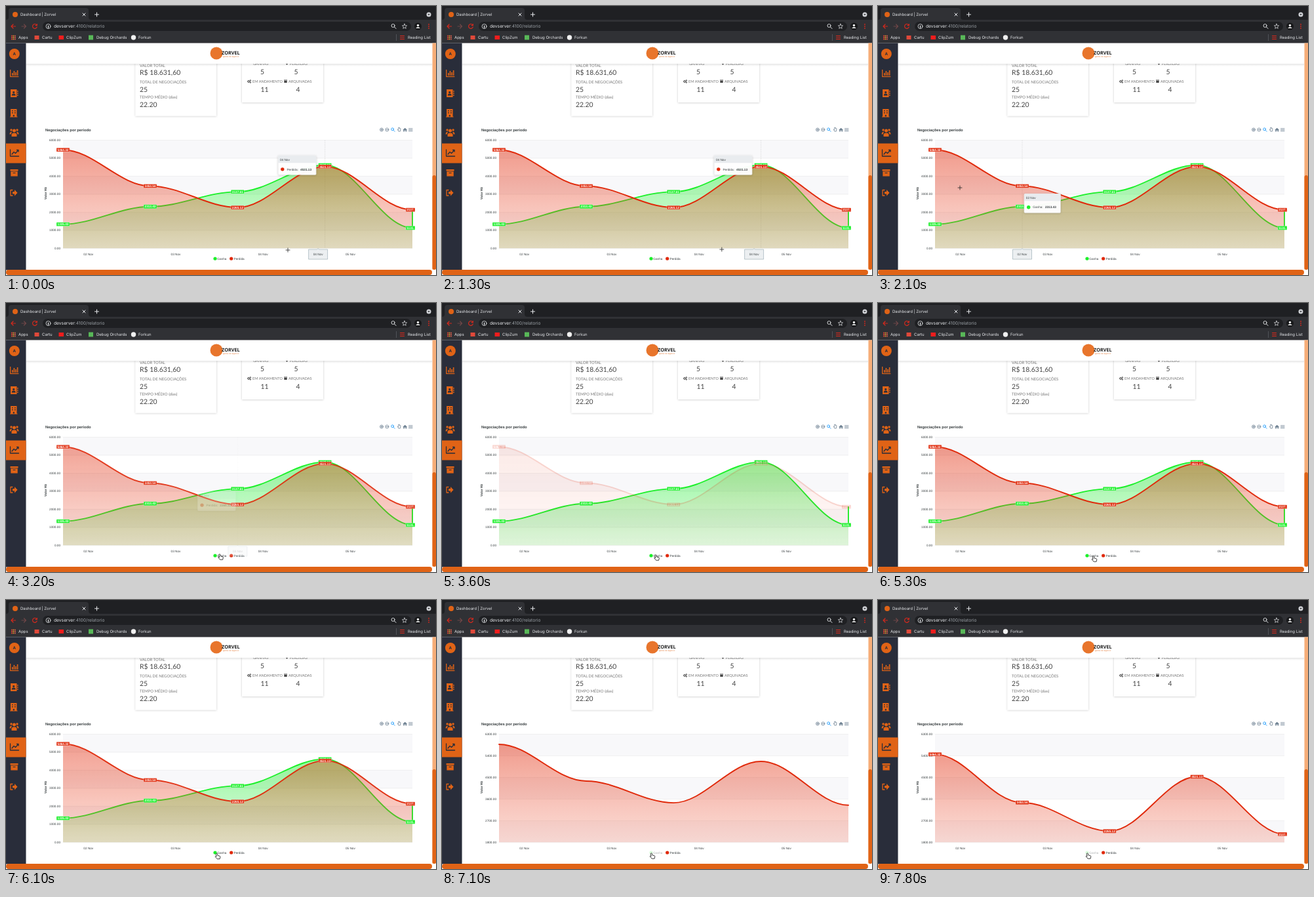
Recreate the animation shown at these times as an HTML page. Size 656 px wide and 410 px high, loop 8 s.

```html
<!DOCTYPE html>
<html lang="pt">
<head>
<meta charset="utf-8">
<title>Dashboard | Zorvel</title>
<style>
html, body { margin: 0; width: 100%; height: 100%; overflow: hidden; background: #fff; }
svg { display: block; width: 100vw; height: 100vh; }
text { text-rendering: geometricPrecision; }
.ui { font: 6px Inter, sans-serif; fill: #e8eaed; }
.card { font: 6px Lato, sans-serif; fill: #777; }
.big { font-size: 10.400px; fill: #444; }
.mid { text-anchor: middle; }
.chart { font: 4.7px "Liberation Sans", Arial, sans-serif; fill: #373d3f; }
.bold { font-weight: bold; }
.stroke { fill: none; stroke-linecap: round; stroke-linejoin: round; }
</style>
</head>
<body>
<svg viewBox="0 0 656 410">
  <defs>
    <linearGradient id="redFill" x2="0" y2="1"><stop stop-color="#e0290a" stop-opacity=".47"/><stop offset="1" stop-color="#ec4a2a" stop-opacity=".19"/></linearGradient>
    <linearGradient id="greenFill" x2="0" y2="1"><stop stop-color="#1cf02a" stop-opacity=".47"/><stop offset="1" stop-color="#50e860" stop-opacity=".19"/></linearGradient>
    <linearGradient id="fade" x2="0" y2="1"><stop stop-opacity=".1"/><stop offset="1" stop-opacity="0"/></linearGradient>
    <filter id="soft" x="-10%" y="-10%" width="120%" height="120%"><feDropShadow dx="0" dy=".5" stdDeviation="1.800" flood-opacity=".22"/></filter>
  </defs>
  <rect width="656" height="410" fill="#fff"/>

  <!-- summary cards -->
  <g fill="#fff" filter="url(#soft)"><path d="M197.500 70h123.500v97.500h-123.500z"/><path d="M360 70h124v77h-124z"/></g>
  <g class="card">
    <text x="204" y="93">VALOR TOTAL</text><text class="big" x="204" y="105">R$ 18.631,60</text>
    <text x="204" y="117.500">TOTAL DE NEGOCIAÇÕES</text><text class="big" x="204" y="131">25</text>
    <text x="204" y="140.500">TEMPO MÉDIO (dias)</text><text class="big" x="204" y="154">22.20</text>
    <g style="font-size:5.600px">
      <text x="377" y="90">GANHAS</text><text x="433" y="90">PERDIDAS</text>
      <text x="376" y="117">EM ANDAMENTO</text><text x="424" y="117" dx="7">ARQUIVADAS</text>
    </g>
    <g class="big mid"><text x="391" y="104">5</text><text x="442.500" y="104">5</text><text x="394.500" y="131">11</text><text x="445.500" y="131">4</text></g>
    <g fill="#444"><path d="M424 112.500h5v1h-5zM424.300 114h4.400v3h-4.400zM427 88h3l-1.500 2z"/></g>
    <g fill="none" stroke="#444"><circle cx="370" cy="115" r="1.400"/><circle cx="372.800" cy="113.500" r=".8"/><circle cx="372.800" cy="116.500" r=".8"/></g>
  </g>

  <!-- page header -->
  <rect x="31" y="88" width="619" height="4" fill="url(#fade)"/>
  <rect x="31" y="56" width="619" height="32" fill="#fff"/>
  <circle cx="321" cy="72" r="9.500" fill="#e8752c"/>
  <text x="329" y="74" style="font:bold 7.300px 'Noto Sans',sans-serif" fill="#222">ZORVEL</text>
  <text x="331" y="77.500" style="font:2.600px Inter,sans-serif" fill="#e8752c">gestão de negócios</text>

  <!-- browser -->
  <rect width="656" height="22" fill="#1f2023"/>
  <path d="M0 56.500V21q4 0 4-4V7q0-4 4-4h114q4 0 4 4v10q0 4 4 4h526v35.500z" fill="#303135"/>
  <rect x="56" y="24" width="562" height="14" rx="7" fill="#1f2023"/>
  <circle cx="14" cy="13" r="4" fill="#e06316"/>
  <g class="stroke" stroke="#e8eaed">
    <path d="M117 11l4 4m0-4l-4 4M135.500 13h6m-3-3v6"/>
    <path d="M64.500 30.200v3" stroke-width="1.200"/><circle cx="64.500" cy="31" r="3.500" stroke-width=".8"/>
    <circle cx="590.500" cy="30" r="2.500" stroke-width=".9"/><path d="M592.500 32l2.500 2.500"/>
    <path d="M608 27.200l1 2.500 2.600.2-2 1.800.6 2.600-2.200-1.400-2.200 1.400.6-2.600-2-1.800 2.600-.2z" stroke-width=".7"/>
  </g>
  <circle cx="645" cy="13" r="3.500" fill="#d0d2d6"/><path d="M643.300 12.300h3.400l-1.700 2z" fill="#1f2023"/>
  <g class="stroke" stroke="#d4281c" stroke-width="1.200">
    <path d="M14.500 31h-6.500m3-3l-3 3 3 3M46.800 29a3.400 3.400 0 1 0 .4 3M47.300 27.500v2.200h-2.300"/>
    <path d="M24 31h6.500m-3-3l3 3-3 3" stroke="#6e4648"/>
    <path d="M601.500 45.500h6m-6 2.500h6m-6 2.500h6"/>
  </g>
  <circle cx="628.500" cy="31" r="5.500" fill="#17181a"/><path d="M625 34q3.500-4 7 0z" fill="#eee"/><circle cx="628.500" cy="29.500" r="1.700" fill="#eee"/>
  <g fill="#d4281c"><circle cx="645" cy="28" r=".9"/><circle cx="645" cy="31" r=".9"/><circle cx="645" cy="34" r=".9"/></g>
  <g class="ui">
    <text x="22" y="15.200">Dashboard | Zorvel</text>
    <text x="73" y="33.300" style="font-size:6.700px">devserver<tspan fill="#9aa0a6">:4100/relatorio</tspan></text>
    <text x="19" y="50.200">Apps</text><text x="55" y="50.200">Cartu</text><text x="92" y="50.200">ClipZum</text>
    <text x="138" y="50.200">Debug Orchards</text><text x="202" y="50.200">Forkun</text><text x="613" y="50.200">Reading List</text>
  </g>
  <g id="apps"></g>
  <rect x="43.500" y="45" width="7" height="6" fill="#e0493a"/><rect x="80.500" y="45" width="7.500" height="6" fill="#f01d1d"/>
  <rect x="126" y="44.500" width="7" height="7" fill="#58b858"/><circle cx="194.500" cy="48" r="3.700" fill="#f2f2f2"/>
  <path d="M595.500 43v10" stroke="#5f6368" stroke-width=".7"/>

  <!-- sidebar and scrollbars -->
  <rect y="56.500" width="30.500" height="346" fill="#292d3a"/>
  <rect y="209.500" width="30.500" height="30" fill="#e06316"/>
  <circle cx="12.800" cy="73" r="8" fill="#e06316"/>
  <text class="ui mid" x="12.800" y="75.300" style="font-weight:700;fill:#292d3a">A</text>
  <g fill="#e06316">
    <path d="M6 97h1.300v10h12v1.300H6zM9 102h1.600v4H9zM11.600 99h1.600v7h-1.600zM14.200 101h1.600v5h-1.600zM16.800 98h1.600v8h-1.600z"/>
    <path d="M7 127h9.500v12H7zM17.200 129h1.300v2h-1.300zM17.200 132h1.300v2h-1.300zM17.200 135h1.300v2h-1.300z"/>
    <path d="M7 157h9.500v11.500H17.500v1H6v-1h1z"/>
    <circle cx="12.500" cy="190" r="2.500"/><circle cx="8" cy="189" r="1.700"/><circle cx="17" cy="189" r="1.700"/>
    <path d="M8.500 199v-3q0-2.500 4-2.500t4 2.500v3zM5.500 195.500q0-4 3.500-3.800l-1.500 3.800zM19.500 195.500q0-4-3.500-3.800l1.500 3.800z"/>
    <path d="M6.500 249h12v2.500h-12zM7.300 252.300h10.400v7.200H7.300z"/>
    <path d="M10 283h3v-3l4.500 4.700-4.500 4.700v-3h-3z"/>
  </g>
  <path d="M10.500 254.500h4" stroke="#292d3a"/>
  <g fill="#292d3a"><circle cx="11.700" cy="131.500" r="1.600"/><path d="M8.800 136.500q0-3 2.900-3t2.900 3zM9 159h1.600v1.600H9zM13 159h1.600v1.600H13zM9 162h1.600v1.600H9zM13 162h1.600v1.600H13zM10.800 166h2v2.500h-2z"/></g>
  <path class="stroke" d="M6.500 219v10h13M9 226l3-3.500 2.500 2 4.500-5m-2.500 0h2.500v2.500" stroke="#292d3a" stroke-width="1.300"/>
  <path class="stroke" d="M10 280.500H7v8.500h3" stroke="#e06316" stroke-width="1.300"/>
  <path d="M650.500 56.500h5.500v345h-5.500z" fill="#f6ad78"/>
  <rect x="650.500" y="258" width="5.500" height="144" rx="2.700" fill="#e06316"/>
  <rect y="402" width="650" height="8" rx="4" fill="#e06316"/>

  <!-- chart -->
  <g class="chart">
    <text class="bold" x="60" y="190.500" style="font-size:5.800px">Negociações por período</text>
    <text class="bold mid" transform="translate(62.300 285.500)rotate(-90)">Valor R$</text>
    <g class="stroke" stroke="#6e8192" stroke-width=".8">
      <circle cx="573" cy="188.500" r="2.500"/><circle cx="581.300" cy="188.500" r="2.500"/>
      <path d="M571.700 188.500h2.600m-1.300-1.300v2.600M580 188.500h2.600M614.500 186.800h5.500m-5.500 1.900h5.500m-5.500 1.900h5.500"/>
      <path d="M597.600 188.500l1.300 2.500h2.500l.6-3.500-.8-1-.4.800v-1.500l-1-.3v-.5l-1 .2-.2 3z"/>
      <g stroke="#008ffb"><circle cx="589.600" cy="187.800" r="1.900"/><path d="M591.200 189.500l1.800 1.800"/></g>
    </g>
    <path d="M605.300 189l3.400-3.200 3.400 3.200h-1v2.500h-1.600v-2h-1.600v2h-1.600V189z" fill="#6e8192"/>
    <g id="axis"></g>
    <path id="guide" stroke="#c8c8c8" stroke-width=".5" stroke-dasharray="1.500 1.200"/>
    <g id="series"></g>
    <g id="labels"></g>
    <g id="days" class="mid"></g>
    <g id="ganha"><circle cx="319" cy="385" r="2.600" fill="#1cf02a"/><text x="322.300" y="386.800">Ganha</text></g>
    <circle cx="343.700" cy="385" r="2.600" fill="#e0290a"/><text x="347.500" y="386.800">Perdida</text>
    <g id="dayTip"><path d="M-14.500 371h13l1.500-1.500 1.500 1.500h13v15h-29z" fill="#eceff1" stroke="#90a4ae" stroke-width=".6"/><text class="mid" y="380.200"></text></g>
    <g id="tip">
      <rect height="29" rx="1.500" fill="#fff" fill-opacity=".96" stroke="#dcdcdc" stroke-width=".5" filter="url(#soft)"/>
      <path fill="#e9ecef"/><text x="2.800" y="7.800"></text>
      <circle cx="6.700" cy="20.500" r="2.700"/><text x="13.300" y="22.200"><tspan></tspan><tspan class="bold" dx="3.200"></tspan></text>
    </g>
  </g>
  <path id="cross" class="stroke" d="M-3 0h6M0-3v6" stroke="#222" stroke-width=".8"/>
  <path id="hand" d="M0 0q1-.8 1.500.6l.4 2.300 3 .8q1.100.3.9 1.600l-.7 2.900h-4L-1.600 5q-.3-1.100.9-.9l.9.5-.9-3.800q0-.7.7-.8z" fill="#fff" stroke="#111" stroke-width=".8"/>
</svg>
<script>
const LOOP = 8000, TOP = 204.5, BASE = 369.3, HEIGHT = BASE - TOP;
const CLICK = 7060, MORPH = 320;
const X = [87, 220, 353.3, 486.6, 620];
const $ = id => document.getElementById(id);
const clamp = v => Math.max(0, Math.min(1, v));
const smooth = p => p * p * (3 - 2 * p);
const mix = (a, b, p) => a + (b - a) * p;
const move = (el, x, y) => el.setAttribute('transform', `translate(${x} ${y})`);
const scale = (v, lo, hi) => BASE - (v - lo) / (hi - lo) * HEIGHT;

const SERIES = {
  green: { name: 'Ganha', color: '#1cf02a', values: [1335.43, 2313.43, 3137.61, 4620.13, 1131.26], dim: [[3980, 5200]] },
  red: { name: 'Perdida', color: '#e0290a', values: [5464.32, 3453.54, 2265.12, 4531.13, 2137.12], dim: [[3170, 3900], [5290, 5850], [6080, CLICK]] }
};

// time, x, y of the pointer
const POINTER = [
  [0, 430, 372], [1250, 430, 372], [2100, 125, 277], [2250, 112, 268], [2500, 110, 266],
  [2900, 416, 335], [3200, 325.5, 383], [3600, 325.5, 384], [4000, 345, 387], [5150, 345, 387],
  [5300, 328, 386], [5900, 321, 386.5], [6620, 321, 386.5], [6700, 319, 386], [LOOP, 319, 386]
];

// start time, point index, series of the tooltip
const TIPS = [[-500, 3, 'red'], [1450, 2, 'red'], [1650, 1, 'green'], [2120, 0, 'red'], [2560, 1, 'red'], [2680, 2, 'red']];
const TIP_END = 3100;

function pointer(t) {
  const i = POINTER.findIndex(k => k[0] > t);
  const a = POINTER[i - 1], b = POINTER[i], p = smooth((t - a[0]) / (b[0] - a[0]));
  return [mix(a[1], b[1], p), mix(a[2], b[2], p)];
}

function opacity(dim, t) {
  const d = dim.find(([from, to]) => t >= from && t < to);
  return d ? mix(1, 0.2, smooth(clamp((t - d[0]) / 150))) : 1;
}

function curve(ys) {
  let d = `M${X[0]} ${ys[0]}`;
  for (let i = 1; i < X.length; i++) {
    const pull = (X[i] - X[i - 1]) * 0.35;
    d += `C${X[i - 1] + pull} ${ys[i - 1]} ${X[i] - pull} ${ys[i]} ${X[i]} ${ys[i]}`;
  }
  return d;
}

function drawAxis(lo, hi, rows) {
  let out = '';
  for (let i = 0; i <= rows; i++) {
    const y = TOP + HEIGHT * i / rows;
    if (i % 2 == 0 && i < rows) out += `<rect x="87" y="${y}" width="533" height="${HEIGHT / rows}" fill="#f8f8fa"/>`;
    out += `<path d="M87 ${y}H620" stroke="#e2e2e2" stroke-width=".5"/>
      <text x="83" y="${y + 1.5}" text-anchor="end">${mix(hi, lo, i / rows).toFixed(2)}</text>`;
  }
  $('axis').innerHTML = out;
}

function build() {
  for (let i = 0; i < 9; i++)
    $('apps').innerHTML += `<rect x="${8 + i % 3 * 2.5}" y="${44.7 + (i / 3 | 0) * 2.5}" width="1.700" height="1.700" fill="${['#ea4335', '#f0a030', '#e06050'][i % 3]}"/>`;
  for (let i = 0; i < 4; i++)
    $('days').innerHTML += `<text x="${125.8 + i * 133.2}" y="380">0${i + 2} Nov</text>`;
  for (const [key, s] of Object.entries(SERIES)) {
    $('series').innerHTML += `<g id="${key}"><path fill="url(#${key}Fill)"/><path class="stroke" stroke="${s.color}" stroke-width="1.900"/></g>`;
    const tags = s.values.map((v, i) => {
      const w = i < 4 ? 20 : 14, text = i < 4 ? v.toFixed(2) : Math.floor(v) + '.';
      return `<g><rect x="${-w / 2}" y="-2.900" width="${w}" height="5.800" rx=".6" fill="${s.color}" stroke="#fff" stroke-width=".3"/>
        <text class="bold mid" y="1.700" style="fill:#fff">${text}</text></g>`;
    });
    $('labels').innerHTML += `<g id="${key}Tags">${tags.join('')}</g>`;
  }
}

function drawSeries(key, t, p) {
  const { values, dim } = SERIES[key], group = $(key), tags = $(key + 'Tags');
  const toY = v => mix(scale(v, 0, 6000), scale(v, 1800, 6300), p);
  const ys = values.map(toY), d = curve(ys);
  const [area, line] = group.children;
  area.setAttribute('d', `${d}V${BASE}H${X[0]}z`);
  line.setAttribute('d', key == 'green' ? d + 'V' + toY(2137) : d);
  [...tags.children].forEach((tag, i) => move(tag, i < 4 ? X[i] : 617, ys[i]));
  const shown = key == 'red' || t < CLICK;
  const settled = t < CLICK || t > CLICK + MORPH;
  group.style.opacity = shown ? opacity(dim, t) : 0;
  tags.style.opacity = shown && settled ? opacity(dim, t) : 0;
}

function place([, i, key]) {
  const w = key == 'red' ? 58 : 55.5, shift = i == 3 ? -10.5 : 0;
  const x = X[i] + shift;
  return [i < 2 ? x + 3 : x - 3 - w, scale(SERIES[key].values[i], 0, 6000) - (i == 3 ? 16.5 : 19.5), x];
}

function drawTip(t) {
  const n = TIPS.findLastIndex(k => k[0] <= t), now = TIPS[n], [, i, key] = now;
  const alpha = 1 - clamp((t - TIP_END) / 130);
  const a = place(TIPS[Math.max(0, n - 1)]), b = place(now);
  const p = smooth(clamp((t - now[0]) / 150));
  const [x, y, dayX] = b.map((v, k) => mix(a[k], v, p));
  const tip = $('tip'), [box, head, day, dot, line] = tip.children;
  const s = SERIES[key], w = key == 'red' ? 58 : 55.5, date = `0${i + 1} Nov`;
  box.setAttribute('width', w);
  head.setAttribute('d', `M0 11V1.500q0-1.500 1.500-1.500H${w - 1.5}q1.500 0 1.500 1.500V11z`);
  day.textContent = $('dayTip').lastChild.textContent = date;
  dot.setAttribute('fill', s.color);
  line.children[0].textContent = s.name + ':';
  line.children[1].textContent = s.values[i].toFixed(2);
  move(tip, x, y);
  move($('dayTip'), dayX, 0);
  $('guide').setAttribute('d', `M${X[i]} ${TOP}V${BASE}`);
  for (const id of ['tip', 'dayTip', 'guide']) $(id).style.opacity = alpha;
}

let zoomed;
function draw(t) {
  const hidden = t >= CLICK;
  if (hidden !== zoomed) {
    zoomed = hidden;
    hidden ? drawAxis(1800, 6300, 5) : drawAxis(0, 6000, 6);
    $('ganha').style.opacity = hidden ? 0.4 : 1;
    $('ganha').firstChild.style.opacity = hidden ? 0.4 : 1;
  }
  const p = smooth(clamp((t - CLICK) / MORPH));
  drawSeries('green', t, 0);
  drawSeries('red', t, p);
  drawTip(t);
  const [x, y] = pointer(t), onLegend = t >= 3150;
  move($('cross'), x, y);
  move($('hand'), x, y);
  $('cross').style.opacity = onLegend ? 0 : 1;
  $('hand').style.opacity = onLegend ? 1 : 0;
}

build();
const start = performance.now();
function tick() {
  draw((performance.now() - start) % LOOP);
  requestAnimationFrame(tick);
}
tick();
</script>
</body>
</html>
```
